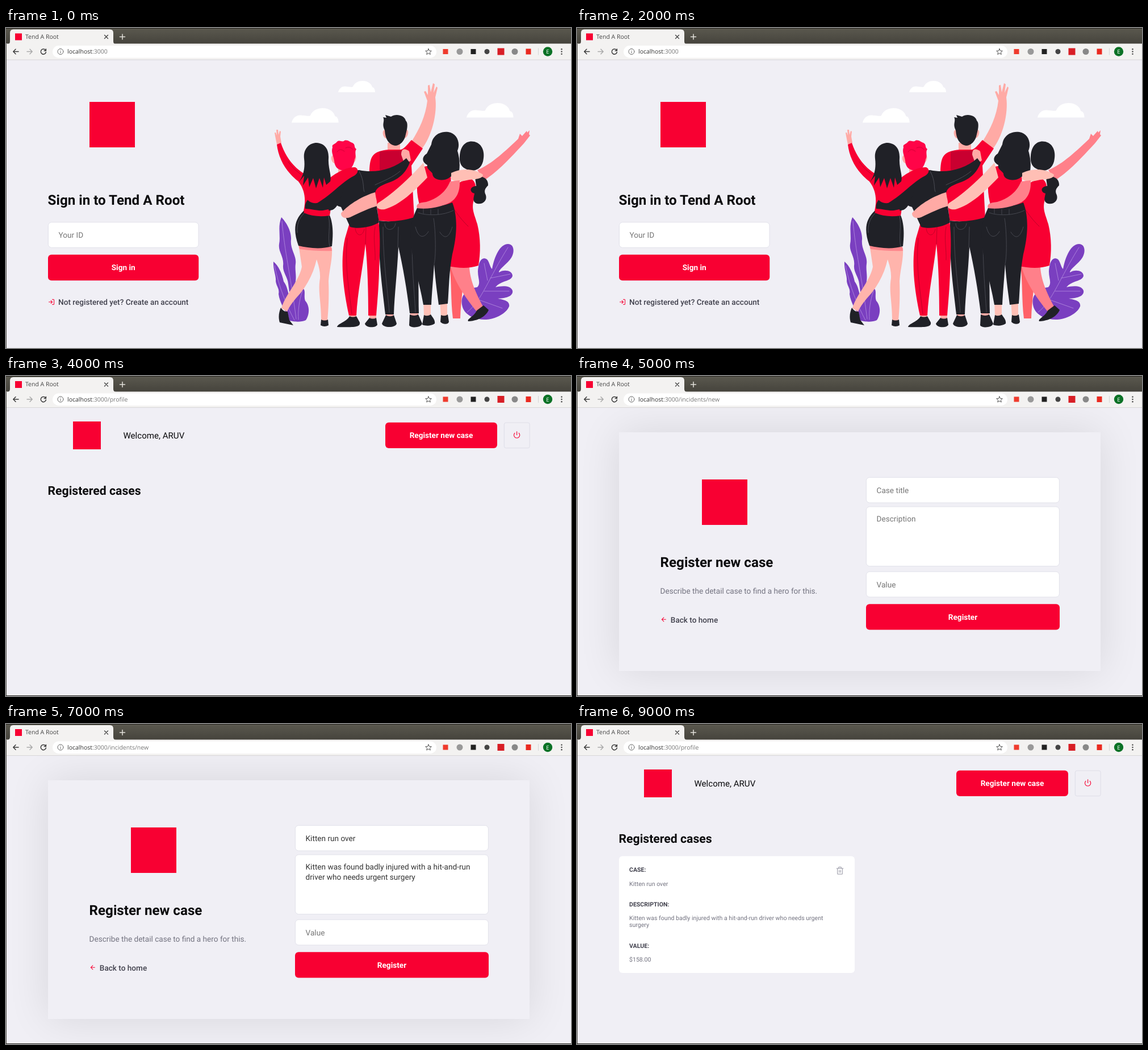
These frames come from a looping animation (995 px wide and 563 px high, 10000 ms). An HTML page:

```html
<!DOCTYPE html>
<html lang="en">
<head>
<meta charset="utf-8">
<title>Tend A Root</title>
<style>
  html, body { margin: 0; width: 100%; height: 100%; overflow: hidden; background: #f0eff5; }
  svg { display: block; width: 995px; height: 563px; }
  text { font: 400 13.6px Roboto, sans-serif; fill: #737380; text-rendering: geometricPrecision; }
  .ui { font: 10.5px "Open Sans", sans-serif; fill: #444; }
  .avatar { font: 9.5px "Open Sans", sans-serif; fill: #fff; text-anchor: middle; }
  .h1 { font-size: 24.2px; font-weight: 700; fill: #0a0a0c; }
  .h2 { font-size: 21.2px; font-weight: 700; fill: #0a0a0c; }
  .link { font-weight: 500; fill: #41414d; }
  .button { font-weight: 700; fill: #fff; text-anchor: middle; }
  .hint { fill: #757575; }
  .typed { fill: #333; }
  .welcome { font-size: 15.1px; fill: #0a0a0c; }
  .label { font-size: 10.6px; font-weight: 700; fill: #41414d; }
  .detail { font-size: 10.6px; }
</style>
</head>
<body>
<svg id="stage" viewBox="0 0 995 563"></svg>
<script>
const BRAND = 'Tend A Root';
const RED = '#f80032', BG = '#f0eff5', BORDER = '#dcdce6';
const DARK = '#202127', SKIN = '#ffaaa5', PALE = '#ffbfb5', ROSE = '#ff808a', PURPLE = '#7a3fc0';

const text = (x, y, content, cls = '') => `<text x="${x}" y="${y}" class="${cls}">${content}</text>`;
const rect = (x, y, w, h, fill, r = 0, extra = '') =>
  `<rect x="${x}" y="${y}" width="${w}" height="${h}" rx="${r}" fill="${fill}" ${extra}/>`;
const circle = (x, y, r, fill) => `<circle cx="${x}" cy="${y}" r="${r}" fill="${fill}"/>`;
const shape = (fill, ...paths) => paths.map(d => `<path d="${d}" fill="${fill}"/>`).join('');
const line = (color, width, d) =>
  `<path d="${d}" fill="none" stroke="${color}" stroke-width="${width}" stroke-linecap="round" stroke-linejoin="round"/>`;
const icon = (x, y, size, color, d) =>
  `<g transform="translate(${x} ${y}) scale(${size / 24})">${line(color, 2, d)}</g>`;

const ARROW = 'M19 12H5M12 19L5 12L12 5';
const LOGIN = 'M15 3H19Q21 3 21 5V19Q21 21 19 21H15M10 17L15 12L10 7M15 12H3';
const POWER = 'M18.4 6.6A9 9 0 1 1 5.6 6.6M12 2V12';
const TRASH = 'M3 6H21M19 6V20Q19 22 17 22H7Q5 22 5 20V6M8 6V4Q8 2 10 2H14Q16 2 16 4V6M10 11V17M14 11V17';

const logo = (x, y, size) => rect(x, y, size, size, RED);
const button = (x, y, w, label) =>
  rect(x, y, w, 45.4, RED, 6) + text(x + w / 2, y + 27.4, label, 'button');
const field = (x, y, w, hint, value, h = 44.6) => {
  const lines = (value || hint).split('\n');
  const first = h > 50 ? 26 : 27.2;
  return rect(x, y, w, h, '#fff', 6, `stroke="${BORDER}" stroke-width=".8"`) +
    lines.map((s, i) => text(x + 18.2, y + first + i * 18.2, s, value ? 'typed' : 'hint')).join('');
};
const panel = (y, h) =>
  rect(74, y, 848, h, '#000', 0, 'opacity=".1" filter="url(#blur)"') + rect(74, y, 848, h, BG);
const backLink = (y, label) =>
  icon(146.8, y - 11.2, 12.1, RED, ARROW) + text(164.8, y, label, 'link');

function chrome(path, shift) {
  return rect(0, 0, 995, 28, 'url(#bar)') + rect(0, 0, 995, 1, '#25241f') +
    rect(0, 27.5, 995, 28, '#f3f2f1') +
    `<g transform="translate(0 ${shift})">` +
    shape('#f3f2f1', 'M2 28Q7 28 7 23V8Q7 2 13 2H183Q189 2 189 8V23Q189 28 194 28Z') +
    rect(0, 55, 995, 1, '#d8d6d8') +
    rect(16, 9, 12, 12, RED) + text(34, 18.3, BRAND, 'ui') +
    line('#444', 1.4, 'M173.5 12L179.5 18M179.5 12L173.5 18') +
    line('#e4e2dc', 1.5, 'M200.5 15H209.5M205 10.5V19.5') +
    line('#3c3c3c', 1.5, 'M22 41H13M17 36.8L12.8 41L17 45.2M69.5 38.2A4.6 4.6 0 1 0 70.4 42M70.4 36.5V39.6H67.2') +
    line('#aaa', 1.5, 'M37 41H46M42 36.8L46.2 41L42 45.2') +
    rect(82, 30.5, 676, 21.5, '#fff', 10.7) +
    line('#666', 1, 'M101 41A5 5 0 1 0 91 41A5 5 0 1 0 101 41M96 40.7V43.5M96 38.5V38.6') +
    text(108, 44.8, `<tspan fill="#333">localhost</tspan><tspan fill="#777">:3000${path}</tspan>`, 'ui') +
    line('#555', 1, 'M744 36L745.5 39.5L749.3 39.8L746.4 42.3L747.3 46L744 44L740.7 46L741.6 42.3L738.7 39.8L742.5 39.5Z') +
    rect(769.5, 36.5, 9, 9, '#ef3b2d') + circle(799, 41, 5.5, '#999') +
    rect(818.5, 36.5, 9, 9, '#222') + circle(847, 41, 4.5, '#444') +
    rect(865.5, 35, 12, 12, '#d81f26') + circle(896, 41, 5.5, '#888') + rect(915.5, 36, 9, 10, '#ea2a20') +
    rect(937, 35, 1, 12, '#d5d5d5') + circle(954, 41, 8.2, '#0b7226') + text(954, 44.5, 'E', 'avatar') +
    [36.8, 41, 45.2].map(y => circle(978.5, y, 1.2, '#444')).join('') + '</g>' +
    rect(0, 28, 1, 535, '#55534d') +
    (shift ? '' : rect(0, 562, 995, 1, '#25241f'));
}

const cloud = (x, y, s) => `<g transform="translate(${x} ${y}) scale(${s})">` +
  shape('#fff', 'M0 20C2 12 8 9 14 10C20 10 24 12 26 10C29 3 36 0 43 0C53 0 59 6 60 11C64 12 65 16 65 20Z') + '</g>';

const plants =
  shape(PURPLE,
    'M485 333C478 350 484 366 481 380C479 394 490 402 488 418C487 430 496 438 497 450L506 515H515C513 495 511 470 507 456C514 440 508 428 510 415C512 400 500 390 502 372C503 356 492 340 485 333Z',
    'M471 411C470 425 476 436 475 445C476 455 482 458 480 468C482 484 492 498 500 512L514 516C512 500 504 488 500 475C496 465 496 455 489 446C486 432 480 418 471 411Z',
    'M497 514C500 500 505 480 512 470C514 460 520 455 524 459C528 463 524 472 527 480C536 490 534 505 528 514C520 518 505 517 497 514Z',
    'M803 487C800 470 812 458 830 456C838 448 828 436 832 420C834 406 842 402 848 408C852 414 852 420 856 424C860 402 870 380 884 380C895 380 896 394 890 404C884 414 868 424 868 430C876 424 892 426 892 436C890 446 872 444 862 456C872 454 888 452 892 462C894 472 880 476 866 476C876 478 888 480 886 490C880 504 860 512 846 513C828 514 806 506 803 487Z') +
  line('#b58ee0', .8, 'M486 340C490 390 502 440 511 512M473 418C480 455 495 490 508 514M522 463C516 480 514 498 515 513M812 500C838 480 850 440 884 386M848 444L842 414M853 440L888 433M842 463L886 463M832 478L874 493M832 478L812 470');

const womanRight =
  shape('#ff6168', 'M781 417H808C806 450 801 480 800 511H787C783 480 785 450 781 417Z') +
  shape(ROSE,
    'M783 420H816C817 438 822 456 840 490L829 499C812 478 790 448 783 420Z',
    'M830 250C855 240 882 214 902 195L905 186L909 190L917 181L918 184L922 180L921 187L923 189L912 203C894 222 870 250 842 268Z') +
  shape(RED, 'M776 300C784 280 800 266 820 266C830 272 828 288 824 302C819 318 825 328 830 345C836 370 836 395 832 418C814 424 795 422 778 419L770 330Z') +
  line('#bc0028', 1, 'M790 320C800 335 807 342 814 349M783 350C781 375 779 395 779 417') +
  shape(DARK,
    'M799 226C800 205 812 197 825 200C840 204 844 220 840 235C836 250 822 254 812 249C802 245 798 238 799 226Z',
    'M826 263C838 258 850 265 849 277C844 282 841 286 845 294C848 304 839 311 830 309C820 306 824 298 825 291C816 289 816 279 828 278Z',
    'M829 497L841 488L850 496C846 506 834 515 814 516C811 512 824 508 829 497Z');

const manTall =
  shape(SKIN, 'M714 200C728 178 739 155 742 128L736 112L739 111L743 118L743 101L746 100L748 113L752 97L755 99L753 114L758 103L760 105L756 122C760 150 750 192 731 214Z',
    'M672 202H694V220H672Z', 'M668 179C661 178 663 194 670 194ZM704 179C711 177 709 194 701 194Z', 'M669 496H682V510H669ZM712 496H726V510H712Z') +
  shape(RED, 'M640 252C641 224 646 217 674 214L694 214C700 214 705 207 714 197L734 212L714 242L719 335C700 341 677 341 656 339L652 300L640 292Z') +
  shape('#c90030', 'M658 217L699 215C710 226 708 246 690 252H658Z') +
  shape(DARK,
    'M667 180C661 168 668 164 664 157L670 158L668 153L678 156C686 150 702 153 704 163C709 167 706 180 704 187C702 199 694 207 685 207C674 205 668 196 667 180Z',
    'M657 339C676 342 700 339 719 333C723 345 719 365 722 390C728 430 726 470 727 502H711C706 460 699 420 691 385C689 430 684 470 683 504H668C662 450 655 405 657 339Z',
    'M669 505C674 508 679 508 683 505L688 520C686 528 664 528 662 520ZM711 504Q719 508 726 504L733 520C731 528 712 528 710 523Z') +
  line('#50515a', .8, 'M667 344C667 358 684 358 686 344M690 386L691 350M664 350C664 410 672 460 675 500M716 345C713 410 719 460 721 500');

const womanCurly =
  shape(PALE, 'M735 480H748V506H736ZM764 478H777V508H766Z') +
  shape(RED, 'M730 246C750 238 775 244 783 258C785 282 781 300 785 311L729 314C722 290 722 270 730 246Z') +
  shape(DARK,
    'M728 308C748 315 770 314 786 307C797 335 793 370 786 398C780 430 780 460 778 485L762 487C760 470 756 445 754 415C752 445 750 465 749 487L735 487C728 445 713 405 713 370C711 342 720 325 728 308Z',
    'M749 205C751 188 766 181 779 183C794 185 801 202 795 216C798 226 800 238 798 252C794 264 785 258 780 264C768 271 751 267 751 256C747 250 740 248 742 241C731 235 733 226 741 221Z',
    'M736 505Q742 508 748 504C752 510 756 514 755 520C748 525 738 524 733 522ZM766 505Q773 508 778 504L780 517C778 523 768 521 765 517Z') +
  line('#50515a', .8, 'M726 325C742 331 770 330 788 321M735 318V326M748 319V328M761 319V328M754 415C758 398 756 350 753 335M721 350C726 370 736 371 744 358M786 350C780 370 772 372 764 359') +
  shape(PALE,
    'M735 237C716 258 688 287 655 308C650 314 655 321 667 319C694 311 718 288 742 263Z',
    'M784 255C802 246 825 247 840 258C840 265 828 266 816 267C804 270 792 272 784 266Z') +
  shape(ROSE, 'M799 268C800 290 792 302 780 308C760 317 740 319 724 317C721 310 728 307 740 306C760 300 775 288 782 270Z');

const manRedHair =
  shape(SKIN, 'M585 235H608V258H585ZM576 224C570 225 573 239 580 238ZM613 223C619 223 617 238 610 237Z',
    'M606 499H616V512H606ZM640 499H652V515H640Z', 'M696 223C696 212 702 211 710 217L713 233L702 240Z') +
  shape(RED, 'M605 343L656 340C660 365 658 400 657 430C656 460 654 480 652 506H638C638 465 637 420 633 380C628 425 619 465 617 506H604C594 460 588 410 597 370Z') +
  line('#bc0028', .9, 'M633 380L634 350M615 353C617 367 628 368 631 354M650 350C646 370 651 390 650 408M601 370C596 420 605 465 609 503') +
  shape(DARK,
    'M575 272C590 262 605 250 622 250C650 256 683 249 705 229L711 237C704 255 692 266 674 272C658 278 649 283 650 294L657 342C642 351 620 354 606 350L590 315C570 310 570 288 575 272Z',
    'M605 507Q611 510 617 507L623 518C624 526 617 527 583 526C584 520 600 517 605 507ZM640 510Q646 513 652 510L654 522C652 528 633 528 632 520Z') +
  line('#50515a', .9, 'M622 252C632 270 628 284 631 288M650 276C665 269 681 263 694 252') +
  shape(SKIN, 'M650 289C630 295 604 309 590 326C590 334 598 336 606 333C622 325 642 316 654 313Z') +
  shape('#ff0448', 'M578 234C577 225 572 219 575 210C573 204 580 205 583 200C588 196 592 202 596 198C602 196 606 201 610 202C616 205 612 210 617 213C613 219 618 224 614 231C612 245 605 252 595 251C586 250 579 246 578 234Z') +
  line('#c90030', .8, 'M583 218Q588 210 596 217M598 211Q606 207 611 214');

const womanLeft =
  shape(SKIN, 'M477 205L474 190L473 184L475 184L477 189L476 179L479 179L480 188L482 181L484 182L483 191L485 202Z') +
  shape('#ffb4ac',
    'M515 380L550 387C548 414 538 442 519 466C508 478 499 489 495 499L485 493C491 470 516 446 521 420Z',
    'M541 387H574C575 408 570 420 568 445C569 470 568 494 566 515H555C555 480 549 465 553 440C554 420 545 405 541 387Z') +
  shape('#ff858b', 'M515 382L573 385L574 392Q548 393 517 389Z') +
  shape(RED,
    'M477 205L484 202C492 226 506 245 526 257H566C577 267 574 310 570 330L523 326C529 304 527 286 515 270C494 254 480 231 477 205Z') +
  shape(DARK,
    'M524 322C538 330 556 333 569 327C577 345 576 365 574 384C554 390 532 387 515 383C505 355 508 337 524 322Z',
    'M527 318C525 304 535 298 552 286L578 265L596 278C590 300 585 315 575 320C558 325 540 318 527 318Z',
    'M484 492Q489 500 496 499L499 514L506 523L482 518C479 508 481 499 484 492ZM555 513Q561 516 567 513L568 523Q561 527 554 523Z') +
  line('#50515a', .9, 'M568 330C572 350 566 365 570 385M525 326C515 335 512 348 513 360') +
  shape(RED, 'M528 318Q545 325 568 319L570 330Q545 334 524 325Z',
    'M528 296C534 284 548 287 565 268C580 255 600 244 615 245C622 248 620 256 613 260C590 272 575 292 548 308C537 309 530 304 528 296Z') +
  line('#bc0028', .9, 'M497 235C505 247 512 252 520 258') +
  shape(DARK, 'M525 230C523 213 534 202 547 202C562 203 569 214 568 230C567 246 574 260 571 270L564 276L560 263L558 281L552 264L546 282L541 264L534 280L532 263L523 277L525 260L515 272C524 260 527 246 525 230Z');

const people = cloud(585, 93, 1) + cloud(503, 141, 1.27) + cloud(811, 132, 1.27) + plants +
  womanRight + manTall + womanCurly + manRedHair + womanLeft;

const signIn = id => people + logo(147, 130, 80) +
  text(73.6, 311, `Sign in to ${BRAND}`, 'h1') +
  field(74.4, 341.8, 264.6, 'Your ID', id) + button(74, 398.8, 265.3, 'Sign in') +
  icon(74, 476, 12.1, RED, LOGIN) +
  text(92, 487.2, 'Not registered yet? Create an account', 'link') + chrome('', .5);

const register = () => panel(98, 423) + logo(220, 170, 80) +
  text(146.6, 323.8, 'Register', 'h1') +
  text(146.6, 370.8, 'Make your registration, enter the platform and') +
  text(146.6, 395, 'help people find the cases of your NGO.') + backLink(445.4, 'Back to login') +
  field(509.4, 184.3, 340, 'Name of the NGO') + field(509.4, 235.8, 340, 'Email') +
  field(509.4, 287.3, 340, 'WarbleUp number') +
  field(509.4, 338.8, 273, 'City') + field(789.4, 338.8, 60, 'PC') +
  button(509, 395.8, 341, 'Register') + chrome('/register', 0);

const CASE = 'Kitten run over';
const STORY = 'Kitten was found badly injured with a hit-and-run\ndriver who needs urgent surgery';

const newCase = (title, story, value) => panel(99, 420) + logo(220, 182, 80) +
  text(146.6, 336.4, 'Register new case', 'h1') +
  text(146.6, 383, 'Describe the detail case to find a hero for this.') + backLink(433.5, 'Back to home') +
  field(509.4, 178.4, 340, 'Case title', title) + field(509.4, 230, 340, 'Description', story, 104.6) +
  field(509.4, 344.3, 340, 'Value', value) +
  button(509, 401.2, 341, 'Register') + chrome('/incidents/new', 0);

const caseCard = rect(74, 232.6, 415, 205.4, '#fff', 6) +
  icon(455.5, 250.4, 15.1, '#a8a8b3', TRASH) +
  text(92, 260.3, 'CASE:', 'label') + text(92, 284.5, CASE, 'detail') +
  text(92, 320.8, 'DESCRIPTION:', 'label') +
  text(92, 345, 'Kitten was found badly injured with a hit-and-run driver who needs urgent', 'detail') +
  text(92, 357.3, 'surgery', 'detail') +
  text(92, 393.5, 'VALUE:', 'label') + text(92, 417.5, '$158.00', 'detail');

const profile = cards => logo(118, 80, 49) + text(206.4, 109.6, 'Welcome, ARUV', 'welcome') +
  button(668, 81.7, 197, 'Register new case') +
  rect(877.4, 82.1, 44.8, 44.6, 'none', 3, `stroke="${BORDER}" stroke-width=".9"`) +
  icon(892.8, 96.6, 13.6, RED, POWER) +
  text(73.6, 209, 'Registered cases', 'h2') + cards + chrome('/profile', 0);

const defs = `<defs>
  <linearGradient id="bar" x2="0" y2="1"><stop stop-color="#5b594f"/><stop offset="1" stop-color="#45433c"/></linearGradient>
  <filter id="blur" filterUnits="userSpaceOnUse" x="-80" y="-60" width="1160" height="740"><feGaussianBlur stdDeviation="38"/></filter>
</defs>`;

// One scene per second.
const scenes = [
  signIn(), register(), signIn(), signIn('9d41c7be'), profile(''),
  newCase(), newCase(CASE), newCase(CASE, STORY), newCase(CASE, STORY, '158'), profile(caseCard)
];

const stage = document.getElementById('stage');
let shown = -1;
function draw() {
  const index = Math.floor(performance.now() / 1000) % scenes.length;
  if (index !== shown) stage.innerHTML = defs + rect(0, 0, 995, 563, BG) + scenes[shown = index];
  requestAnimationFrame(draw);
}
draw();
</script>
</body>
</html>
```
